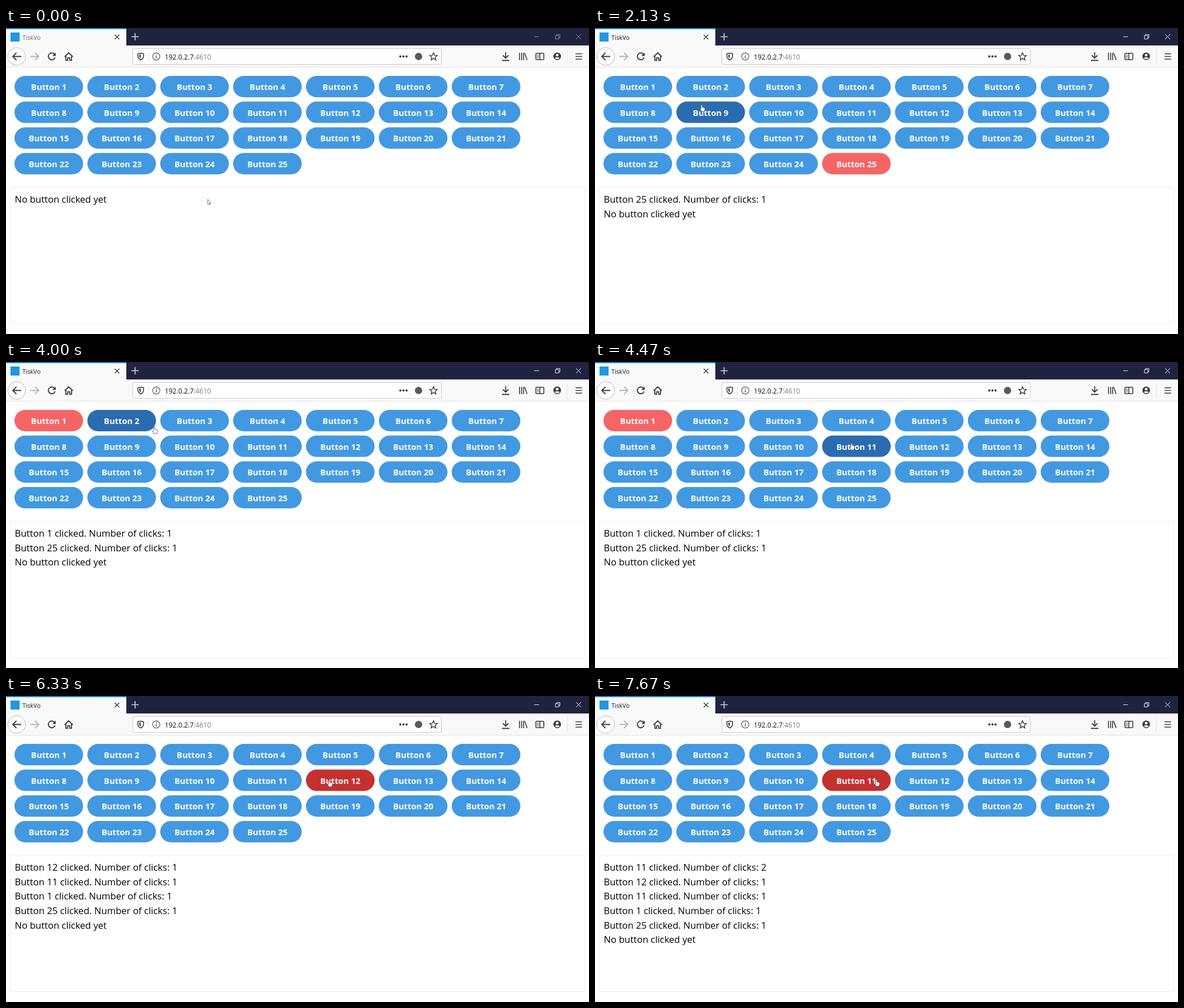
An HTML page with a canvas that plays this animation: 1032 by 543 pixels, repeating every 8000 ms.

```html
<!DOCTYPE html>
<html lang="en">
<head>
<meta charset="utf-8">
<title>Button log</title>
<style>
  html, body { margin: 0; width: 100%; height: 100%; overflow: hidden; background: #fff; }
  canvas { display: block; }
</style>
</head>
<body>
<canvas id="stage" width="1032" height="543"></canvas>
<script>
const ctx = document.getElementById('stage').getContext('2d');
const FONT = '"Open Sans", "Noto Sans", sans-serif';
const LOOP = 8000;
const TICKS_PER_MS = 0.015;
const INK = '#3b3b3f';
const FOCUS_TICK = 19;

const clicks = [[20, 25], [49, 1], [75, 11], [95, 12], [115, 11]];

// Pointer strokes: first tick, number of ticks, end point, optional bend.
const start = [357, 304];
const moves = [
  { at: 2, n: 11, to: [450, 238] },
  { at: 27, n: 13, to: [104, 103] },
  { at: 58, n: 11, to: [454, 144], via: [279, 110.3] },
  { at: 82, n: 7, to: [572, 149] },
  { at: 100, n: 8, to: [498, 148] }
];

const buttons = Array.from({ length: 25 }, (_, i) => ({
  id: i + 1,
  x: 15 + (i % 7) * 129,
  y: 85 + Math.floor(i / 7) * 45.6,
  w: 121.5,
  h: 38
}));

const ease = u => 1 - (1 - u ** 1.4) ** 3.4;

function pointerAt(tick) {
  let from = start;
  for (const m of moves) {
    if (tick < m.at) break;
    const u = Math.min(1, (tick - m.at + 1) / m.n);
    const p = ease(u);
    const via = m.via || m.to.map((v, k) => (v + from[k]) / 2);
    const pos = m.to.map((v, k) =>
      (1 - p) ** 2 * from[k] + 2 * p * (1 - p) * via[k] + p * p * v);
    if (u < 1) return pos;
    from = m.to;
  }
  return from;
}

function inside(b, [x, y]) {
  const r = b.h / 2;
  const cx = Math.max(b.x + r, Math.min(b.x + b.w - r, x));
  return Math.hypot(x - cx, y - b.y - r) < r + 1;
}

function text(str, x, y, size, color, weight = 400, align = 'left') {
  ctx.font = `${weight} ${size}px ${FONT}`;
  ctx.textAlign = align;
  ctx.fillStyle = color;
  ctx.fillText(str, x, y);
}

function rect(x, y, w, h, color) {
  ctx.fillStyle = color;
  ctx.fillRect(x, y, w, h);
}

function path(d, color, width = 1.7, fill) {
  const p = new Path2D(d);
  if (fill) {
    ctx.fillStyle = fill;
    ctx.fill(p);
  }
  if (width) {
    ctx.strokeStyle = color;
    ctx.lineWidth = width;
    ctx.stroke(p);
  }
}

function circle(x, y, r, color, width, fill) {
  ctx.beginPath();
  ctx.arc(x, y, r, 0, Math.PI * 2);
  if (fill) {
    ctx.fillStyle = fill;
    ctx.fill();
  }
  if (width) {
    ctx.strokeStyle = color;
    ctx.lineWidth = width;
    ctx.stroke();
  }
}

function pill(x, y, w, h, r, fill) {
  ctx.beginPath();
  ctx.roundRect(x, y, w, h, r);
  ctx.fillStyle = fill;
  ctx.fill();
}

function drawTabs(active) {
  rect(0, 0, 1032, 31, '#202340');
  rect(0, 0, 213, 31, '#f9f9fa');
  rect(0, 0, 213, 2, '#0a84ff');
  rect(8, 8, 16, 16, '#2196e3');
  text('TiskVo', 29, 20.5, 10.8, active ? '#151519' : '#67676c');
  path('M192.5 12l8 8m0-8l-8 8', '#3c3c42', 1.5);
  path('M222 15.5h13M228.5 9v13', '#d2d3d9', 1.7);
  const tone = active ? '#e4e4e8' : '#85879a';
  path('M935 15.5h8.5', tone, 1);
  path('M972.5 13.5h6v6h-6zM974.5 13.5v-2h6v6h-2', tone, 1);
  path('M1009 11l9 9m0-9l-9 9', tone, 1);
}

function drawStar(cx, cy) {
  let d = '';
  for (let i = 0; i < 10; i++) {
    const r = i % 2 ? 3.2 : 7;
    const a = i * Math.PI / 5 - Math.PI / 2;
    d += `${i ? 'L' : 'M'}${cx + r * Math.cos(a)} ${cy + r * Math.sin(a)}`;
  }
  path(d + 'z', INK, 1.5);
}

function drawToolbar() {
  rect(0, 31, 1032, 39, '#f9f9fa');
  rect(0, 69, 1032, 1, '#e1e1e2');

  circle(19, 50.5, 15.7, '#b9b9bc', 1, '#fff');
  path('M27 50.5H12.5M18.5 44l-6.5 6.5 6.5 6.5', INK, 1.9);
  path('M43 50.5h14.5M51.5 44l6.5 6.5-6.5 6.5', '#b5b5b8', 1.9);
  path('M85.7 46.5A6 6 0 1 0 86.8 52', INK, 1.9);
  path('M88 43.5v6h-6z', INK, 0, INK);
  path('M103.7 51l7.3-7 7.3 7M106 50v7.3h3.2v-4.5h3.6v4.5h3.2V50', INK, 1.8);

  ctx.beginPath();
  ctx.roundRect(224.5, 36.5, 546, 28, 2);
  ctx.fillStyle = '#fff';
  ctx.fill();
  ctx.strokeStyle = '#c9c9cc';
  ctx.lineWidth = 1;
  ctx.stroke();
  path('M238.5 44.5l5 1.2v3.8c0 3.3-2 5.8-5 7.3-3-1.5-5-4-5-7.3v-3.8z', INK, 1.6);
  path('M238.5 47v7c-1.8-1.2-2.6-2.7-2.6-4.5v-2z', INK, 0, INK);
  path('M252.5 42v18', '#e4e4e6', 1);
  circle(266, 50.5, 6.4, '#56565a', 1.2);
  rect(265.3, 49.4, 1.5, 4.6, '#56565a');
  rect(265.3, 46.7, 1.5, 1.6, '#56565a');
  text('192.0.2.7', 281, 55.5, 12.1, '#111');
  const hostWidth = ctx.measureText('192.0.2.7').width;
  text(':4610', 281 + hostWidth, 55.5, 12.1, '#7b7b80');
  for (const x of [698, 703.5, 709]) circle(x, 50.5, 1.9, '', 0, INK);
  circle(730.3, 50.5, 6.5, '', 0, '#5a5a5e');
  drawStar(756.8, 51);

  path('M884.5 43v10M879.5 48.5l5 5 5-5M878 57.5h13', INK, 1.8);
  path('M909 44v13M912.7 44v13M916.3 44v13M918 44.5l4.5 12.3', INK, 1.6);
  path('M939.5 44.8h11a1.5 1.5 0 0 1 1.5 1.5v8.4a1.5 1.5 0 0 1-1.5 1.5h-11a1.5 1.5 0 0 1-1.5-1.5v-8.4a1.5 1.5 0 0 1 1.5-1.5zM945 45v11', INK, 1.6);
  path('M940 48h3M940 50.5h3M940 53h3', INK, 1);
  circle(975.7, 50.3, 6.7, '', 0, INK);
  circle(975.7, 48.2, 2.4, '', 0, '#f9f9fa');
  path('M971.2 53.2q4.5-2.4 9 0-1.7 2.3-4.5 2.3t-4.5-2.3z', '', 0, '#f9f9fa');
  path('M993.5 37v27', '#e6e6e8', 1);
  path('M1008.2 45.8h11.6M1008.2 50.5h11.6M1008.2 55.2h11.6', INK, 1.6);
}

function drawButtons(hovered, last) {
  for (const b of buttons) {
    const hot = b === hovered;
    const color = b.id === last
      ? (hot ? '#c53030' : '#f56565')
      : (hot ? '#2b6cb0' : '#4299e1');
    pill(b.x, b.y, b.w, b.h, b.h / 2, color);
    text(`Button ${b.id}`, b.x + b.w / 2, b.y + 25.2, 14.6, '#fff', 700, 'center');
  }
}

function drawLog(done) {
  ctx.strokeStyle = '#ebedf0';
  ctx.lineWidth = 1;
  ctx.strokeRect(7.5, 282.5, 1017, 242);
  const counts = {};
  const lines = ['No button clicked yet'];
  for (const [, id] of done) {
    counts[id] = (counts[id] || 0) + 1;
    lines.unshift(`Button ${id} clicked. Number of clicks: ${counts[id]}`);
  }
  lines.forEach((line, i) => text(line, 15.5, 310 + i * 25.63, 16.55, '#000'));
}

function drawPointer([x, y], hand) {
  ctx.save();
  ctx.translate(x, y);
  ctx.lineJoin = 'round';
  if (hand) {
    path('M-1.2 1Q0 -.6 1.2 1V4.3L4.9 5.3Q6 5.7 6 6.9L5.4 9.6 4.6 12.2H0L-2.9 8.3Q-3.1 6.8 -1.2 7.5Z', '#3f444c', 0.8, '#fff');
  } else {
    path('M0 0V8.8L2 7 3.3 9.8 4.7 9.2 3.5 6.5H6Z', '#555', 0.8, '#fff');
  }
  ctx.restore();
}

function draw(now) {
  const tick = Math.floor((now % LOOP + 4) * TICKS_PER_MS);
  const pointer = pointerAt(tick);
  const hovered = buttons.find(b => inside(b, pointer));
  const done = clicks.filter(([at]) => tick >= at);
  const last = done.length ? done[done.length - 1][1] : 0;

  rect(0, 0, 1032, 543, '#fff');
  drawTabs(tick >= FOCUS_TICK);
  drawToolbar();
  drawButtons(hovered, last);
  drawLog(done);
  drawPointer(pointer, hovered);
}

let origin;
function frame(now) {
  origin ??= now;
  draw(now - origin);
  requestAnimationFrame(frame);
}
requestAnimationFrame(frame);
</script>
</body>
</html>
```
